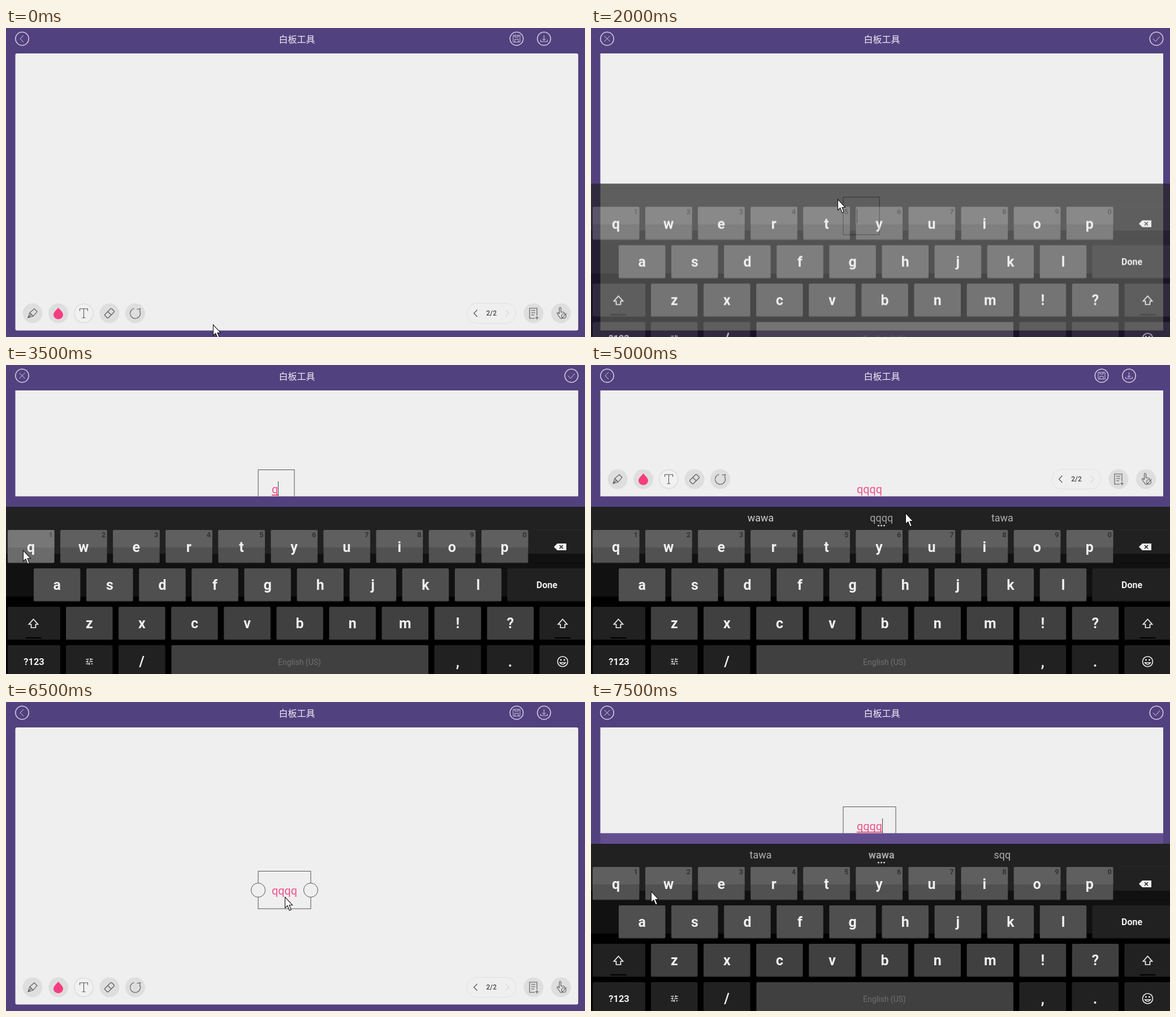
Recreate the animation shown at these times as an HTML page with a canvas. Size 1024 px wide and 547 px high, loop 8000 ms.

```html
<!DOCTYPE html>
<html lang="zh">
<head>
<meta charset="utf-8">
<style>
html, body { margin: 0; width: 100%; height: 100%; overflow: hidden; background: #52417f; }
canvas { display: block; }
</style>
</head>
<body>
<canvas id="stage" width="1024" height="547"></canvas>
<script>
const W = 1024, H = 547, KEYBOARD_TOP = 251, STEP = 500;
const PURPLE = '#52417f', PAPER = '#efefef', PINK = '#f53d80', LILAC = '#d3cde3', INK = '#555';
const FONT = 'Roboto, sans-serif';
const canvas = document.getElementById('stage');
const stage = canvas.getContext('2d');
let g = stage;

const ICONS = {
  back: 'M2.5-6L-3.5 0L2.5 6',
  close: 'M-5-5L5 5M5-5L-5 5',
  check: 'M-6 0L-1.5 5L6-4',
  save: 'M-6-6H6V6H-6ZM-3-6V-3H3V-6M-3 6V1H3V6',
  download: 'M0-6V3M-3 0L0 3L3 0M-6 2V5H6V2',
  pencil: 'M-8 8L-5-1L3-8L8-3L1 5ZM-5-1L1 5M-8 8L-2 2',
  drop: 'M0-10C3-6 8.5-2 8.5 2.5A8.5 8 0 0 1-8.5 2.5C-8.5-2-3-6 0-10Z',
  text: 'M-7-4V-8H7V-4M0-8V8M-3 8H3',
  eraser: 'M-8 2L2-8Q3-9 4-8L8-4Q9-3 8-2L-2 8Q-3 9-4 8L-8 4Q-9 3-8 2ZM-3-3L3 3',
  redo: 'M-2-8.5A9 9 0 1 0 8-4M3-7L9-8L8-2',
  note: 'M2 9H-7V-9H6V4M-4-5H3M-4-1H3M-4 3H1M6 5V11M3 8H9',
  hand: 'M-3 1V-9Q-1.5-12 0-9V-2Q5-3 7 0M-3 1L-5-1Q-8-1-6 2L-1 9H1M9 5A4 4 0 1 1 1 5A4 4 0 1 1 9 5M1 10L10 0',
  previous: 'M3-6L-3 0L3 6',
  next: 'M-3-6L3 0L-3 6',
  shift: 'M0-8L8 1H4V7H-4V1H-8Z',
  erase: 'M-11 0L-5-6H11V6H-5Z',
  cross: 'M-1-3L5 3M5-3L-1 3',
  sliders: 'M-6-4H-1M2-4H6M2-6V-2M-6 0H-3M0 0H6M-3-2V2M-6 4H0M3 4H6M0 2V6',
  smile: 'M9 0A9 9 0 1 1-9 0A9 9 0 1 1 9 0M-5 2Q0 8 5 2Z',
  arrow: 'M.5.5V19.5L4.8 15.5L8.3 24L11.3 22.7L8 14.5H13.5Z'
};
for (const name in ICONS) ICONS[name] = new Path2D(ICONS[name]);

// Each step lasts half a second; the cursor and the interface jump between them.
const steps = [
  { cursor: [366, 525] },
  { cursor: [163, 507] },
  { cursor: [138, 507], pressed: true },
  { cursor: [327, 390] },
  { cursor: [436, 303], edit: true, fading: true, caret: true },
  { cursor: [455, 282], edit: true, keys: true },
  { cursor: [6, 346], edit: true, keys: true, caret: true },
  { cursor: [30, 328], edit: true, keys: true, text: 'q', caret: true, pressed: true },
  { cursor: [1009, 104], edit: true, keys: true, text: 'qqqq', caret: true, words: ['wawa', 'qqqq', 'tawa'] },
  { cursor: [1000, 23], edit: true, keys: true, text: 'qqqq', words: ['wawa', 'qqqq', 'tawa'] },
  { cursor: [556, 262], keys: true, text: 'qqqq', words: ['wawa', 'qqqq', 'tawa'] },
  { cursor: [502, 245], text: 'qqqq' },
  { cursor: [493, 345], text: 'qqqq' },
  { cursor: [493, 345], text: 'qqqq', selected: true },
  { cursor: [484, 350], edit: true, text: 'qqqq', caret: true },
  { cursor: [106, 335], edit: true, keys: true, text: 'qqqq', caret: true, words: ['tawa', 'wawa', 'sqq'], boldWord: true, strip: true }
];

function rect(x, y, w, h, color, radius = 0) {
  g.fillStyle = color;
  g.beginPath();
  g.roundRect(x, y, w, h, radius);
  g.fill();
}

function circle(x, y, r, fill, stroke, width = 1) {
  g.beginPath();
  g.arc(x, y, r, 0, 7);
  if (fill) { g.fillStyle = fill; g.fill(); }
  if (stroke) { g.strokeStyle = stroke; g.lineWidth = width; g.stroke(); }
}

function icon(name, x, y, stroke, width = 1, fill) {
  g.save();
  g.translate(x, y);
  if (fill) { g.fillStyle = fill; g.fill(ICONS[name]); }
  if (stroke) { g.strokeStyle = stroke; g.lineWidth = width; g.stroke(ICONS[name]); }
  g.restore();
}

function label(text, x, y, font, color, align = 'center') {
  g.font = font;
  g.fillStyle = color;
  g.textAlign = align;
  g.fillText(text, x, y);
}

function key(x, y, w, text, color, size = 25) {
  rect(x, y, w, 58.5, color, 2);
  rect(x + 1, y + 57.5, w - 2, 1, 'rgba(0,0,0,.3)');
  if (text) label(text, x + w / 2, y + 30 + size * .33, `bold ${size}px ${FONT}`, '#f0f0f0');
}

function drawKeyboard() {
  const pitch = 93.1, keyWidth = 82.5, dark = '#212121';
  rect(0, KEYBOARD_TOP, W, 83, '#212121');
  rect(0, 334, W, 76, '#111');
  rect(0, 410, W, 137, '#000');

  [...'qwertyuiop'].forEach((letter, i) => {
    const x = 3 + i * pitch;
    key(x, 292, keyWidth, '', '#515151');
    rect(x, 292, keyWidth, 31, '#5f5f5f', [2, 2, 0, 0]);
    label(letter, x + 41, 330.5, `bold 25px ${FONT}`, '#f0f0f0');
    label((i + 1) % 10, x + 80, 304.5, `bold 13px ${FONT}`, '#333', 'right');
  });
  rect(934, 291, 90, 1, '#2c2c2c');
  rect(934, 350, 90, 1, '#080808');
  icon('erase', 980, 322, null, 0, '#f0f0f0');
  icon('cross', 980, 322, '#222', 1.6);

  [...'asdfghjkl'].forEach((letter, i) => key(49 + i * pitch, 360, keyWidth, letter, '#4f4f4f'));
  key(886.5, 360, 140, 'Done', dark, 16);

  [...'zxcvbnm!?'].forEach((letter, i) => key(106 + i * pitch, 428, keyWidth, letter, '#404040'));
  for (const [x, center] of [[3, 48.5], [943.5, 984.5]]) {
    key(x, 428, 93, '', dark);
    icon('shift', center, 458, '#f0f0f0', 1.7);
    rect(center - 14, 482, 28, 2, '#000');
  }

  key(3, 496, 93, '?123', dark, 16.5);
  key(106, 496, keyWidth, '', dark);
  icon('sliders', 147.5, 525, '#e0e0e0', 1.4);
  key(199, 496, keyWidth, '/', dark);
  key(292.5, 496, 454.5, '', '#404040');
  label('English (US)', 519, 530.5, `14px ${FONT}`, '#707070');
  key(757.5, 496, keyWidth, ',', dark);
  key(850.5, 496, keyWidth, '.', dark);
  key(943.5, 496, 93, '', dark);
  icon('smile', 984.5, 525, '#f0f0f0', 1.6);
  circle(981.5, 522, 1.5, '#f0f0f0');
  circle(987.5, 522, 1.5, '#f0f0f0');
}

function drawHeader(edit) {
  label('白板工具', 514.5, 25.5, '500 16px "Noto Sans CJK SC", "Noto Sans CJK", sans-serif', '#f0eef6');
  const buttons = edit
    ? [['close', 28.5], ['check', 1000]]
    : [['back', 28.5], ['save', 903], ['download', 951.5]];
  for (const [name, x] of buttons) {
    circle(x, 19, 11.7, null, LILAC, 1.6);
    icon(name, x, 19, LILAC);
  }
}

function drawToolbar(y, pressed) {
  const tools = [['pencil', 47], ['drop', 92.5], ['text', 137.5], ['eraser', 183], ['redo', 228.5], ['note', 933], ['hand', 981.5]];
  for (const [name, x] of tools) {
    if (name === 'text' && !pressed) circle(x, y, 16.7, '#f1f1f1', '#dedede', 1.7);
    else circle(x, y, 17.5, '#dedede');
    if (name === 'drop') icon(name, x, y, null, 0, PINK);
    else icon(name, x, y, INK, 1.1);
  }
  g.strokeStyle = '#e0e0e0';
  g.lineWidth = 1;
  g.beginPath();
  g.roundRect(815, y - 17.5, 87, 35, 17.5);
  g.stroke();
  icon('previous', 830.5, y, INK, 1.2);
  icon('next', 886.5, y, '#d8d8d8', 1.2);
  label('2/2', 858.5, y + 4, `500 12px ${FONT}`, '#484848');
}

function drawTextBox({ text = '', edit, caret, selected }, shift) {
  const textWidth = text.length * 11.25;
  const y = 299 - shift;
  if (edit || selected) {
    g.strokeStyle = '#555';
    g.lineWidth = 1;
    g.strokeRect(446, y + .5, Math.max(64, Math.round(textWidth + 48)), 66.5);
  }
  if (selected) {
    circle(446, y + 34, 12.5, PAPER, '#555');
    circle(539, y + 34, 12.5, PAPER, '#555');
  }
  label(text, 470, y + 42, `19.8px ${FONT}`, '#f0528c', 'left');
  if (edit) rect(470, y + 44.5, textWidth, 1.8, '#ee3f62');
  if (caret) rect(Math.floor(470 + textWidth), y + 21, 1, 26, '#444');
}

const keyboard = document.createElement('canvas');
keyboard.width = W;
keyboard.height = H;
g = keyboard.getContext('2d');
drawKeyboard();
g = stage;

function drawScene(step) {
  const bottom = step.keys ? 232.5 : 535.5;
  const square = step.edit || step.keys;
  rect(0, 0, W, H, PURPLE);
  drawHeader(step.edit);
  rect(16.5, 45, 995.5, bottom - 45, PAPER, square ? 0 : 3);
  if (step.strip) rect(16.5, bottom, 995.5, KEYBOARD_TOP - bottom, '#634f90');

  g.save();
  g.beginPath();
  g.rect(16.5, 45, 995.5, bottom - 45);
  g.clip();
  if (!step.edit) drawToolbar(step.keys ? 202 : 505, step.pressed);
  drawTextBox(step, step.keys ? 114 : 0);
  g.restore();

  if (step.fading) {
    g.globalAlpha = .7;
    g.drawImage(keyboard, 0, 24.5);
    g.globalAlpha = 1;
  } else if (step.keys) {
    g.drawImage(keyboard, 0, 0);
    if (step.pressed) rect(3, 292, 82.5, 58.5, 'rgba(255,255,255,.15)', 2);
  }
  if (step.words) {
    step.words.forEach((word, i) => {
      const middle = i === 1;
      const weight = middle && step.boldWord ? 'bold ' : '';
      const color = middle ? '#a4a4a4' : step.boldWord || i === 2 ? '#b0b0b0' : '#cfcfcf';
      label(word, 300 + i * 213.7, 277, `${weight}18px ${FONT}`, color);
    });
    for (const x of [507, 512, 517]) rect(x, 283, 3, 2.5, '#c4c4c4');
  }
  icon('arrow', ...step.cursor, '#111', 1.1, '#fff');
}

function frame(now) {
  drawScene(steps[Math.floor(now / STEP) % steps.length]);
  requestAnimationFrame(frame);
}
requestAnimationFrame(frame);
</script>
</body>
</html>
```
